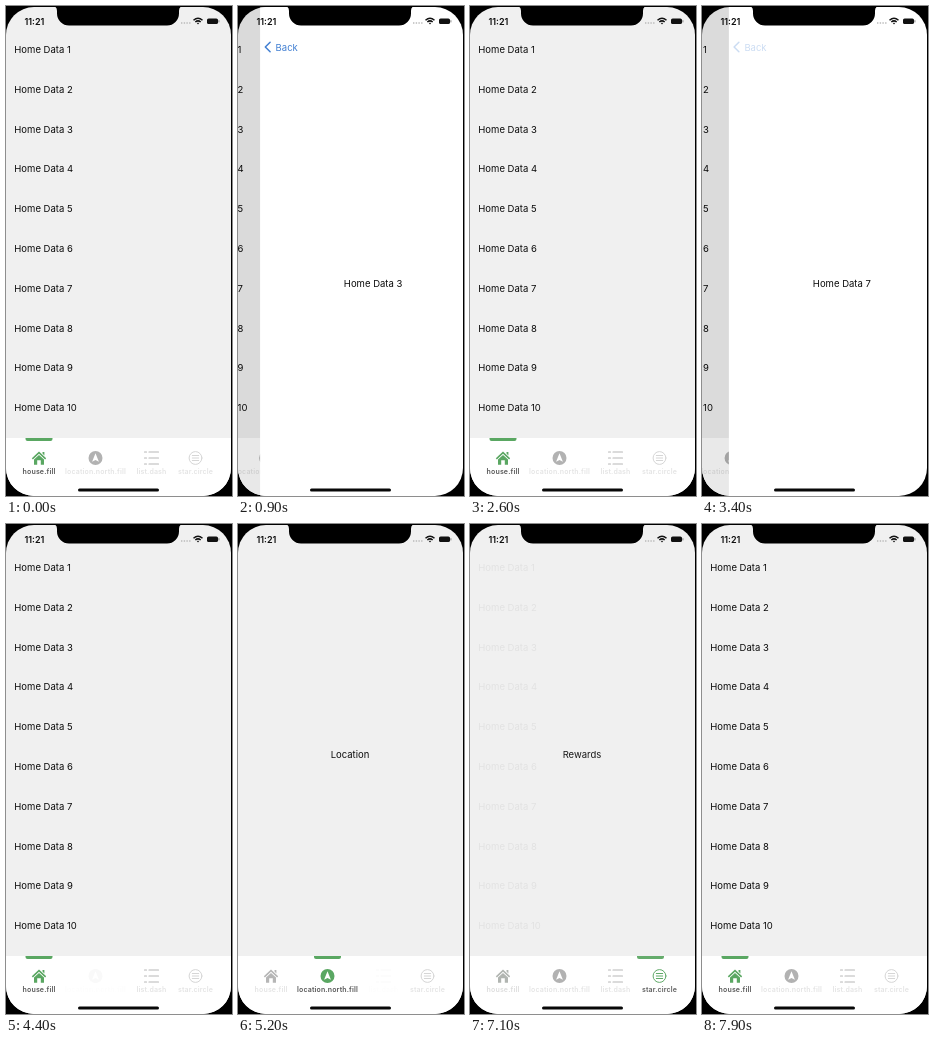
Write an HTML page that moves like this. It is 226x490 px and loops after 8 s.

```html
<!DOCTYPE html>
<html lang="en">
<head>
<meta charset="utf-8">
<title>Tab bar demo</title>
<style>
  html, body { margin: 0; width: 100%; height: 100%; overflow: hidden; background: #000; }
  svg { display: block; width: 100%; height: 100%; }
  text { font: 9.5px Inter, "Noto Sans", sans-serif; fill: #0c0c0c; }
  .mid { text-anchor: middle; }
  .tab text { font-size: 7px; font-weight: 600; letter-spacing: .15px; }
  .line { fill: none; stroke-linecap: round; stroke-linejoin: round; }
</style>
</head>
<body>
<svg viewBox="0 0 226 490">
  <defs>
    <clipPath id="screen"><rect x="0" y="1" width="225" height="489" rx="28"/></clipPath>
  </defs>
  <g clip-path="url(#screen)">
    <g id="root">
      <rect width="226" height="490" fill="#f0f0f0"/>
      <g id="pages"></g>
      <rect y="432" width="226" height="58" fill="#fff"/>
      <path id="marker" d="M-13.5 432h27v1a2 2 0 0 1-2 2h-23a2 2 0 0 1-2-2z" fill="#5aa762"/>
      <g id="tabs"></g>
    </g>
    <rect id="dim" width="226" height="490"/>
    <g id="detail">
      <rect width="226" height="490" fill="#fff"/>
      <g id="back">
        <path class="line" d="M10 36.2L5.2 41l4.8 4.8" stroke="#3577cf" stroke-width="1.5"/>
        <text x="15.5" y="44.5" style="fill:#3577cf">Back</text>
      </g>
      <text id="title" class="mid" x="113" y="280.5"></text>
    </g>
    <text x="18.5" y="18.6" style="font-weight:600;font-size:9px">11:21</text>
    <path d="M175 17h10" stroke="#bbb" stroke-width="1.4" stroke-dasharray="1.4 1.3"/>
    <g class="line" stroke="#111" stroke-width="1.5" style="stroke-linecap:butt">
      <path d="M187.5 14.2q4.5-4 9 0M189.3 16q2.7-2.3 5.4 0"/>
    </g>
    <path d="M190.8 17.1q1.2-.9 2.4 0l-1.2 1.4z" fill="#111"/>
    <rect x="201" y="12.5" width="11" height="5.6" rx="1.6" fill="#111"/>
    <path d="M212.9 14.2v2.2" stroke="#777" stroke-width=".9"/>
    <rect x="72" y="482.4" width="81" height="3" rx="1.5" fill="#080808"/>
    <path d="M46 0q5 0 5 5v2.5a12 12 0 0 0 12 12h98a12 12 0 0 0 12-12V5q0-5 5-5z"/>
  </g>
</svg>
<script>
const LOOP = 8000;
const $ = id => document.getElementById(id);

const tabs = [
  { x: 33, label: 'house.fill', page: '', idle: 182,
    icon: '<path d="M-7.2 452.2L0 445.4l7.2 6.8-1.1 1.2L0 447.7l-6.1 5.7zM3.5 446h1.9v3.4l-1.9-1.8zM-5 453.5L0 449l5 4.5v5.3h-3.2v-4.6h-3.6v4.6H-5z" fill="currentColor"/>' },
  { x: 89.5, label: 'location.north.fill', page: 'Location', idle: 178,
    icon: '<circle cy="452" r="7" fill="currentColor"/><path d="M0 447.3l3.4 8.4L0 453.9l-3.4 1.8z" fill="#fff"/>' },
  { x: 145.5, label: 'list.dash', page: 'Orders', idle: 184,
    icon: '<path class="line" d="M-7 446h2M-2.5 446H7M-7 452h2M-2.5 452H7M-7 458h2M-2.5 458H7" stroke="currentColor" stroke-width="1.2"/>' },
  { x: 189.5, label: 'star.circle', page: 'Rewards', idle: 214,
    icon: '<circle class="line" cy="452" r="6.4" stroke="currentColor"/><path class="line" d="M-3.2 449.5h6.4M-3.2 452h6.4M-3.2 454.5h6.4" stroke="currentColor"/>' }
];

const taps = [[4500, 1], [5250, 2], [6025, 3], [7050, 0]];
const FADE = 350, PRESS = 150;

const rows = Array.from({ length: 10 }, (_, i) =>
  `<text x="8.3" y="${47 + i * 39.8}">Home Data ${i + 1}</text>`).join('');
$('pages').innerHTML = tabs.map(tab =>
  `<g>${tab.page ? `<text class="mid" x="112" y="234">${tab.page}</text>` : rows}</g>`).join('');
$('tabs').innerHTML = tabs.map(tab =>
  `<g class="tab" transform="translate(${tab.x})"><g>${tab.icon}</g><text class="mid" y="468.3">${tab.label}</text></g>`).join('');

const clamp = v => Math.min(1, Math.max(0, v));
const mix = (a, b, k) => a + (b - a) * k;
const ease = k => k * k * (3 - 2 * k);
const rgb = (a, b, k) => `rgb(${a.map((v, i) => mix(v, b[i], k)).join()})`;
const gray = v => [v, v, v];

// Critically damped navigation spring.
function spring(ms) {
  const u = Math.max(0, ms) * 0.01826;
  return 1 - (1 + u) * Math.exp(-u);
}

// Swipe-back drag: [time, covered fraction].
const drag = [[780, 1], [900, .903], [1800, .186], [1960, 0]];

function dragged(t) {
  const i = drag.findIndex(([end]) => t < end);
  if (i < 1) return i ? 0 : 1;
  const [t0, v0] = drag[i - 1], [t1, v1] = drag[i];
  return mix(v0, v1, (t - t0) / (t1 - t0));
}

function navigation(t) {
  if (t < 780) return { cover: spring(t - 250), back: clamp((t - 380) / 270) };
  if (t < 1960) {
    const cover = dragged(t);
    return { cover, back: mix(.3, 1, cover) };
  }
  if (t < 3850) return { cover: spring(t - 3200), back: clamp((t - 3333) / 270) };
  const cover = 1 - spring(t - 3850);
  return { cover: cover < .002 ? 0 : cover, back: clamp(1 - (t - 3850) / 200) };
}

function drawNavigation(t) {
  const { cover, back } = navigation(t);
  $('root').setAttribute('transform', `translate(${-68 * cover})`);
  $('dim').setAttribute('opacity', .1 * cover);
  $('detail').setAttribute('transform', `translate(${226 * (1 - cover)})`);
  $('back').setAttribute('opacity', back);
  $('title').textContent = t < 2500 ? 'Home Data 3' : 'Home Data 7';
}

function drawTabs(t) {
  let from = 0, to = 0, k = 1;
  for (const [start, tab] of taps) {
    if (t < start) break;
    from = to;
    to = tab;
    k = ease(clamp((t - start) / FADE));
  }
  const marker = $('marker');
  marker.setAttribute('transform', `translate(${mix(tabs[from].x, tabs[to].x, k)})`);
  marker.setAttribute('opacity', 1 - 1.2 * k * (1 - k));

  tabs.forEach((tab, i) => {
    const on = i === to ? k : i === from ? 1 - k : 0;
    const tap = taps.find(([, target]) => target === i)[0];
    const pressed = t >= tap - PRESS && t < tap;
    const item = $('tabs').children[i];
    const [icon, label] = item.children;
    item.setAttribute('opacity', pressed ? .08 : 1);
    icon.style.color = rgb(gray(tab.idle), [90, 167, 98], on);
    label.style.fill = rgb(gray(228), gray(85), on);
    $('pages').children[i].setAttribute('opacity', on);
  });
}

function draw() {
  const t = performance.now() % LOOP;
  drawNavigation(t);
  drawTabs(t);
  requestAnimationFrame(draw);
}
draw();
</script>
</body>
</html>
```
